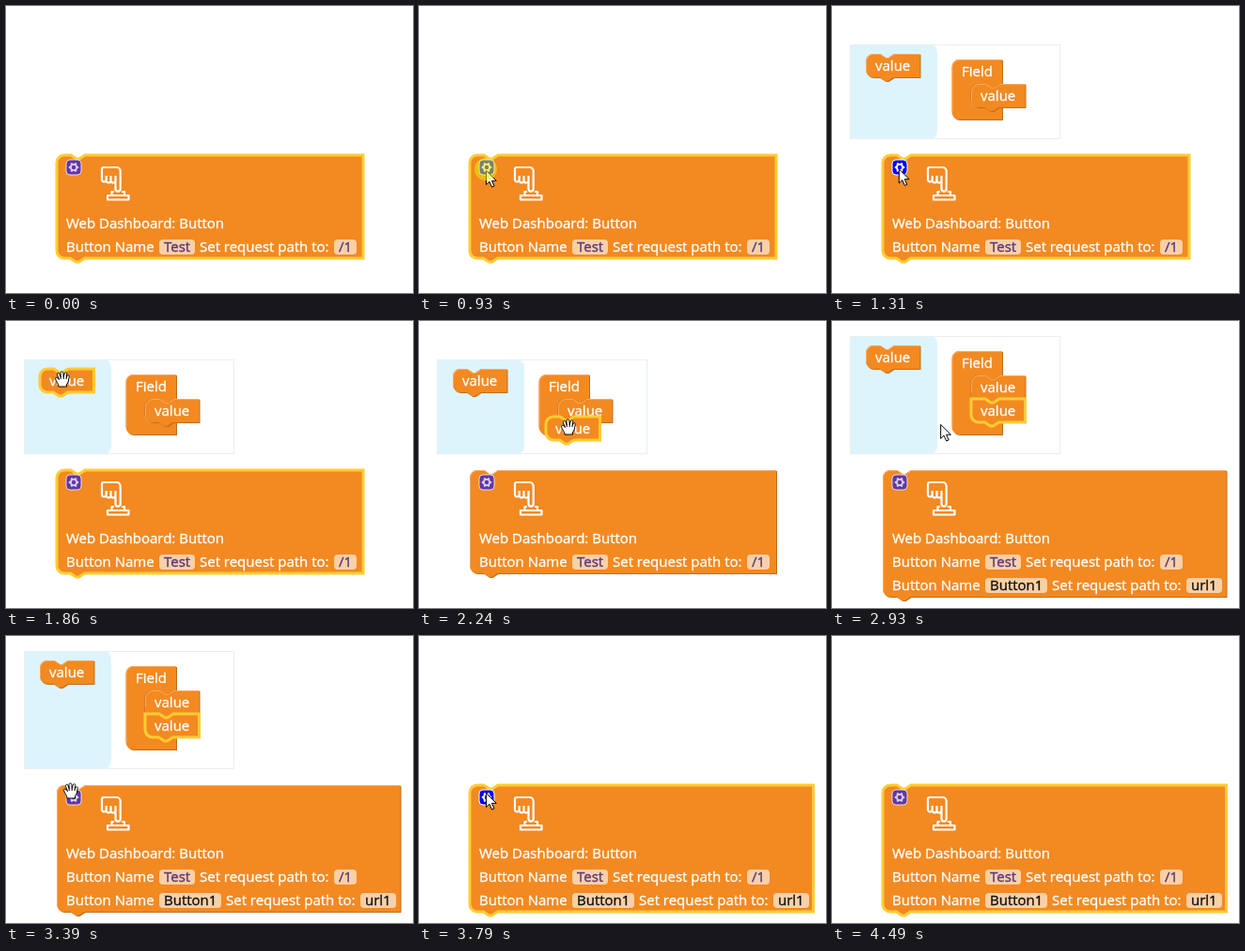
Recreate the animation shown at these times as an HTML page with a canvas. Size 433 by 306 pixels, loop 4910 ms.

```html
<!DOCTYPE html>
<html lang="en">
<head>
<meta charset="utf-8">
<title>Adding a button field</title>
<style>
  html, body { margin: 0; width: 100%; height: 100%; overflow: hidden; background: #fff; }
  canvas { display: block; width: 433px; height: 306px; }
</style>
</head>
<body>
<canvas id="stage"></canvas>
<script>
const W = 433, H = 306, LOOP = 4910;
const ORANGE = '#f38921', DARK = '#c26e1a', LIGHT = '#f7ac64', YELLOW = '#fc3';
const canvas = document.getElementById('stage');
const ctx = canvas.getContext('2d');
const ratio = window.devicePixelRatio || 1;
canvas.width = W * ratio;
canvas.height = H * ratio;

// Bursts of motion: start, end, number of steps.
const bursts = [[240, 760, 8], [930, 930, 1], [1230, 1690, 8], [1780, 2240, 7],
  [2320, 2400, 2], [2550, 3010, 7], [3100, 3390, 5], [3480, 3570, 2], [3710, 3790, 2],
  [3880, 4170, 5], [4260, 4490, 4]];

// Pointer keys: time, x, y.
const pointerKeys = [[240, 312, 292], [610, 52, 180], [760, 71, 175], [1290, 71, 175],
  [1690, 60, 62], [1860, 60, 62], [2240, 159, 113], [2400, 177, 115], [2550, 179, 114],
  [2640, 179, 114], [3010, 70, 107], [3100, 70, 112], [3390, 69, 165], [3570, 71, 167],
  [3790, 71, 167], [4170, 307, 236], [4413, 364, 296]];

function snap(t) {
  let out = 0;
  for (const [a, b, n] of bursts) {
    if (t < a) break;
    const d = (b - a) / (n - 1 || 1);
    out = t >= b ? b : a + Math.floor((t - a) / d) * d;
  }
  return out;
}

function pointerAt(t) {
  const next = pointerKeys.findIndex(k => k[0] > t);
  if (next < 0) return pointerKeys[pointerKeys.length - 1].slice(1);
  if (next === 0) return pointerKeys[0].slice(1);
  const [a, ax, ay] = pointerKeys[next - 1];
  const [b, bx, by] = pointerKeys[next];
  const p = (t - a) / (b - a);
  return [ax + (bx - ax) * p, ay + (by - ay) * p];
}

// A hairline stroke gives the letters a slightly firmer weight.
function text(s, x, y, color = '#fff') {
  ctx.fillStyle = ctx.strokeStyle = color;
  ctx.lineWidth = .35;
  ctx.fillText(s, x, y);
  ctx.strokeText(s, x, y);
  return ctx.measureText(s).width;
}

function roundRect(x, y, w, h, r) {
  ctx.beginPath();
  ctx.roundRect(x, y, w, h, r);
}

function paint(path, x, y, selected, edge) {
  ctx.save();
  ctx.translate(x, y);
  if (!selected) {
    ctx.translate(1, 1);
    ctx.fillStyle = DARK;
    ctx.fill(path);
    ctx.translate(-1, -1);
  }
  ctx.fillStyle = ORANGE;
  ctx.fill(path);
  ctx.lineWidth = selected ? 3 : 1;
  ctx.strokeStyle = selected ? YELLOW : LIGHT;
  if (selected) ctx.stroke(path);
  else {
    ctx.translate(.5, .5);
    ctx.stroke(edge);
  }
  ctx.restore();
}

// Corners joined to a neighbouring block are square.
function stackBlock(x, y, w, h, selected, joined = {}) {
  const corner = joined.above ? 'M0 0' : 'M0 8A8 8 0 0 1 8 0';
  const foot = joined.below ? 'H0' : 'H8a8 8 0 0 1 -8 -8';
  const notch = 'H15l6 4h3l6 -4H';
  const path = new Path2D(`${corner}${notch}${w}V${h}H29.5l-6 4h-3l-6 -4${foot}z`);
  const edge = new Path2D(`${corner}${notch}${w - 1}M0 ${h - 8}V${joined.above ? 0 : 8}`);
  paint(path, x, y, selected, edge);
}

function valueBlock(x, y, selected, joined) {
  stackBlock(x, y, 57.5, 25, selected, joined);
  text('value', x + 10, y + 17.5);
}

function fieldBlock(y, count) {
  const inner = 26 + 25 * count, end = inner + 13;
  const path = new Path2D('M0 8A8 8 0 0 1 8 0H53.5V26H50l-6 4h-3l-6 -4H28a8 8 0 0 0 -8 8' +
    `V${inner - 8}a8 8 0 0 0 8 8H53.5V${end}H8a8 8 0 0 1 -8 -8z`);
  const edge = new Path2D(`M0 ${end - 8}V8A8 8 0 0 1 8 0H52.5M20 ${inner - 8}a8 8 0 0 0 8 8H52.5`);
  paint(path, 127.5, y, false, edge);
  text('Field', 138, y + 17.5);
}

function gear(hover) {
  ctx.save();
  ctx.globalAlpha = hover ? 1 : .6;
  roundRect(64, 164, 16, 16, 4);
  ctx.fillStyle = '#00f';
  ctx.fill();
  ctx.globalAlpha = hover ? 1 : .75;
  ctx.strokeStyle = ctx.fillStyle = '#fff';
  ctx.lineWidth = 1;
  ctx.stroke();
  ctx.translate(72, 172);
  ctx.beginPath();
  for (let i = 0; i < 24; i++) {
    const r = i % 4 < 2 ? 5.3 : 4.1, a = (i - .5) * Math.PI / 12;
    ctx.lineTo(r * Math.cos(a), r * Math.sin(a));
  }
  ctx.closePath();
  ctx.moveTo(2.2, 0);
  ctx.arc(0, 0, 2.2, 0, Math.PI * 2);
  ctx.fill('evenodd');
  ctx.restore();
}

const pressIcon = new Path2D('M116.5 186V195a2.6 2.6 0 0 0 5.2 0V176a4 4 0 0 0 -4 -4H104' +
  'a2 2 0 0 0 -2 2V185a2.3 2.3 0 0 0 4.7 0V181M106.7 185V186a2.4 2.4 0 0 0 4.8 0V181' +
  'M111.5 186a2.4 2.4 0 0 0 5 0V181M115 198H112.5V202M123 198H126V202M108 202H130.5V206.5H108z');

function row(y, name, url, color) {
  let x = 64;
  const label = s => { x = Math.round(x + text(s, x, y) + 5); };
  const input = s => {
    const w = Math.round(ctx.measureText(s).width + 10);
    roundRect(x, y - 13, w, 16, 4);
    ctx.fillStyle = '#fad0a6';
    ctx.fill();
    text(s, x + 5, y, color);
    x += w + 5;
  };
  label('Button Name');
  input(name);
  label('Set request path to:');
  input(url);
}

function mainBlock(selected, rows, hover) {
  stackBlock(54, 159, rows > 1 ? 365.5 : 326, 85 + 25 * rows, selected);
  gear(hover);
  ctx.strokeStyle = '#fff';
  ctx.lineWidth = 2.2;
  ctx.lineJoin = 'round';
  ctx.stroke(pressIcon);
  ctx.lineJoin = 'miter';
  text('Web Dashboard: Button', 64, 237);
  row(262, 'Test', '/1', '#55377f');
  if (rows > 1) row(287, 'Button1', 'url1', '#111');
}

function bubble(top) {
  ctx.fillStyle = '#fff';
  ctx.fillRect(19, top, 224, 142 - top);
  roundRect(20, top, 92, 142 - top, [0, 8, 8, 0]);
  ctx.fillStyle = '#ddf4fd';
  ctx.fill();
  ctx.strokeStyle = '#e9eef0';
  ctx.lineWidth = 1;
  ctx.strokeRect(19.5, top + .5, 223, 141 - top);
}

const arrowShape = new Path2D('M.5 .5V15.5L4 12.2L6.5 18L9 17L6.5 11.3H11.3z');
const handShape = new Path2D('M-4 8C-4 5 -7 2 -7.5 -.5C-7.5 -2.5 -5 -2 -3.5 .5L-5.5 -4.5' +
  'C-6 -7 -3.5 -7.5 -3 -5.5L-1.8 -2L-2 -6.5C-2 -8.5 .7 -8.5 .9 -6.5L1.2 -2.2L2.2 -6' +
  'C2.8 -8 5 -7.5 4.7 -5.5L4.2 -1.5L5 -3.3C6 -5 7.8 -4.2 7.2 -2.3C6.5 .5 6.5 4 4.5 5.5V8z' +
  'M-1.8 -2V0M1.2 -2.2V0M4.2 -1.5L4 0');

function pointer(shape, x, y) {
  ctx.save();
  ctx.translate(x, y);
  ctx.fillStyle = '#fff';
  ctx.fill(shape);
  ctx.strokeStyle = '#000';
  ctx.lineWidth = 1;
  ctx.stroke(shape);
  ctx.restore();
}

function clickSpot() {
  ctx.beginPath();
  ctx.arc(71, 174, 12, 0, Math.PI * 2);
  ctx.fillStyle = 'rgba(232,232,0,.55)';
  ctx.fill();
}

function releaseRing() {
  ctx.beginPath();
  ctx.arc(172, 88, 9.5, 0, Math.PI * 2);
  ctx.strokeStyle = 'rgba(128,128,128,.6)';
  ctx.lineWidth = 8;
  ctx.stroke();
}

function draw(time) {
  const t = snap(time);
  const during = (a, b) => t >= a && t < b;
  const [px, py] = pointerAt(t);
  const shown = during(240, 4480);
  const hand = during(1600, 2550) || during(3250, 3480);
  const hover = shown && !hand && px >= 64 && px <= 80 && py >= 164 && py <= 180;
  const dropped = t >= 2550;

  ctx.setTransform(ratio, 0, 0, ratio, 0, 0);
  ctx.fillStyle = '#fff';
  ctx.fillRect(0, 0, W, H);
  ctx.font = '15px "Open Sans", "Noto Sans", sans-serif';

  mainBlock(!during(1930, 3700), dropped ? 2 : 1, hover);
  if (during(1230, 3700)) {
    const top = dropped ? 16 : 41;
    bubble(top);
    valueBlock(36, top + 10, false);
    fieldBlock(top + 16, dropped ? 2 : 1);
    valueBlock(148, top + 42, false, { below: dropped });
    if (dropped) valueBlock(148, 83, true, { above: true });
    else if (t >= 1780) valueBlock(px - 24, py - 11, true);
  }
  if (during(2550, 2620)) releaseRing();
  if (shown) pointer(hand ? handShape : arrowShape, px, py);
  if (during(930, 1230) || during(3560, 3700)) clickSpot();
}

const start = performance.now();
function tick() {
  draw((performance.now() - start) % LOOP);
  requestAnimationFrame(tick);
}
tick();
</script>
</body>
</html>
```
